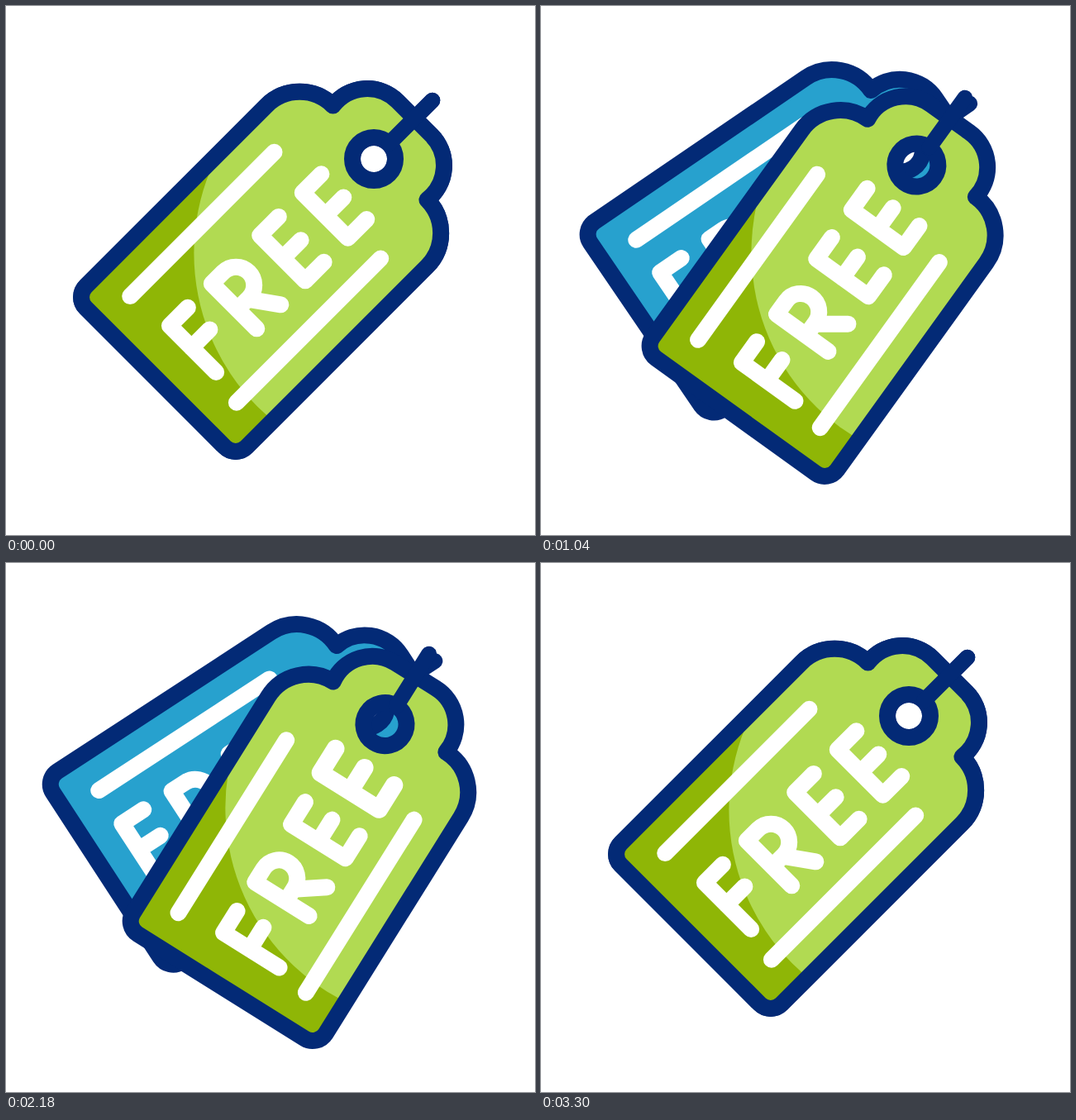
Recreate the animation shown at these times as an HTML page. Size 640 by 640 pixels, loop 3.52 s.

```html
<!DOCTYPE html>
<html lang="en">
<head>
<meta charset="utf-8">
<title>Free tags</title>
<style>
  html, body { margin: 0; width: 100%; height: 100%; overflow: hidden; background: #fff; }
  svg { display: block; width: 100vw; height: 100vh; }
  .line { fill: none; stroke-width: 20; stroke-linecap: round; stroke-linejoin: round; }
  .navy { stroke: #032a76; }
  .white { stroke: #fff; }
  .spark { stroke: #ffc94d; }
</style>
</head>
<body>
<svg viewBox="0 0 640 640" role="img" aria-label="FREE">
  <defs>
    <!-- tag space: the knot is the origin, the tail points to -x -->
    <path id="body" d="M-427.5-137.5H-118.5A57 57 0 0 1-61.5-80.5A52 52 0 0 1-2.5-29V29A52 52 0 0 1-61.5 80.5A57 57 0 0 1-118.5 137.5H-427.5A18.5 18.5 0 0 1-446 119V-119A18.5 18.5 0 0 1-427.5-137.5Z"/>
    <path id="fill" fill-rule="evenodd" clip-rule="evenodd"/>
    <clipPath id="inside"><use href="#fill" clip-rule="evenodd"/></clipPath>
    <g id="trim" class="line">
      <use href="#body" class="navy"/>
      <circle class="navy" cx="-72.1" r="26"/>
      <path class="navy" stroke-width="19" d="M-46 0H28"/>
      <path class="white" d="M-398-91H-151.5M-398 91H-151.5"/>
    </g>
  </defs>
  <g id="sparks" class="line spark"></g>
  <g id="blue">
    <use href="#fill" fill="#27a1ce"/>
    <use href="#trim"/>
  </g>
  <g id="green">
    <use href="#fill" fill="#8fb606"/>
    <circle cx="-121" cy="112.4" r="262.5" fill="#b1da52" clip-path="url(#inside)"/>
    <use href="#trim"/>
  </g>
</svg>
<script>
const LOOP = 3520, STEP = 20;
const $ = id => document.getElementById(id);

function add(parent, name, attrs) {
  const el = document.createElementNS('http://www.w3.org/2000/svg', name);
  for (const k in attrs) el.setAttribute(k, attrs[k]);
  return parent.appendChild(el);
}

// The hole's edge lies under the ring
$('fill').setAttribute('d', $('body').getAttribute('d') +
  'M-52.1 0a20 20 0 1 0-40 0a20 20 0 1 0 40 0Z');

// Letters, each drawn around its own centre
const E = 'M16-39H-16V38.5H16M-16 0H15';
const letters = [
  { x: -374, d: 'M15.5-39H-15.5V40.5M-15.5-1.5H15.5' },
  { x: -297, d: 'M-20.5 38V-39H-1A22 22 0 0 1-1 5H-20.5M-3 5L20.5 38' },
  { x: -219, d: E },
  { x: -146, d: E }
];

function drawWord(tag, dx, dy) {
  const word = add(tag, 'g', { class: 'line white', transform: `translate(${dx} ${dy})` });
  return letters.map(({ x, d }) =>
    add(word, 'path', { d, transform: `translate(${x} 0)` }));
}
drawWord($('blue'), -7, -3);
const word = drawWord($('green'), 0, 7);

// Sparks run from an inner to an outer point
const sparks = [
  [156.75, 135.25, 160.5, 109],
  [104, 140, 96.5, 130],
  [81.5, 188, 54, 178]
].map(p => ({ p, el: add($('sparks'), 'line', {}) }));

// Swing keys: time, degrees
const swing = {
  green: [[200, 0], [640, 8], [1260, -13], [2628, -13], [3300, 0]],
  blue: [[200, 0], [580, -5], [1200, 11.9], [2594, 11.9], [3262, 0]]
};

const ease = p => p < .5 ? 4 * p ** 3 : 1 - 4 * (1 - p) ** 3;
const part = (t, a, b) => Math.min(1, Math.max(0, (t - a) / (b - a)));

function valueAt(keys, t) {
  let v = keys[0][1];
  for (let i = 1; i < keys.length; i++) {
    const [t0, v0] = keys[i - 1], [t1, v1] = keys[i];
    if (t > t0) v = v0 + (v1 - v0) * ease(part(t, t0, t1));
  }
  return v;
}

function draw(t) {
  for (const id in swing) {
    const turn = valueAt(swing[id], t);
    $(id).setAttribute('transform',
      `rotate(${turn} 496 131) translate(496 134) rotate(-45)`);
  }

  // Pulse passing along the word
  word.forEach((el, i) => {
    const start = 1340 + i * 140;
    const size = 1 + .155 * Math.sin(Math.PI * part(t, start, start + 560)) ** 2;
    el.setAttribute('transform', `translate(${letters[i].x} 0) scale(${size})`);
  });

  const head = ease(part(t, 2220, 2480)), tail = ease(part(t, 2400, 2736));
  const length = head - tail;
  for (const { p: [x0, y0, x1, y1], el } of sparks) {
    const put = (n, k) => {
      el.setAttribute('x' + n, x0 + (x1 - x0) * k);
      el.setAttribute('y' + n, y0 + (y1 - y0) * k);
    };
    put(1, tail);
    put(2, head);
    el.style.strokeWidth = 21 * Math.min(1, length * 4);
    el.style.display = length > 0 ? '' : 'none';
  }
}

const begin = performance.now();
function tick() {
  const t = (performance.now() - begin) % LOOP;
  draw(Math.floor(t / STEP) * STEP);
  requestAnimationFrame(tick);
}
draw(0);
requestAnimationFrame(tick);
</script>
</body>
</html>
```
